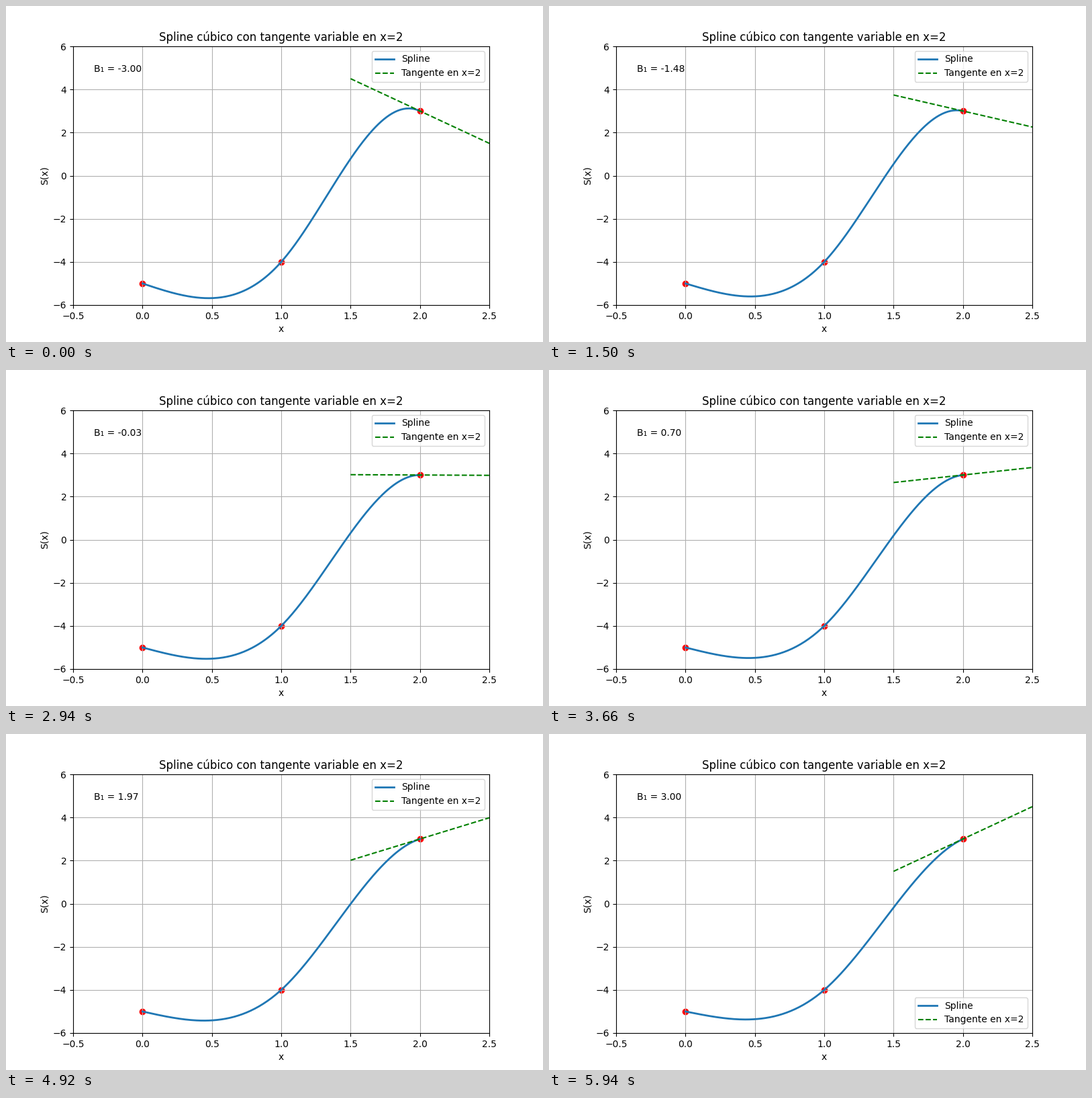
A matplotlib script for the animation above (6 s loop, 800x500 px).

```python
import numpy as np
import matplotlib.pyplot as plt
from matplotlib.animation import FuncAnimation

FRAMES = 100
INTERVAL = 60
KNOTS_X = np.array([0, 1, 2])
KNOTS_Y = np.array([-5, -4, 3])
SLOPES = np.linspace(-3, 3, FRAMES)


def hermite(t, y0, y1, m0, m1):
    """Cubic on [0, 1] with given end values and end slopes."""
    d = y1 - y0
    return y0 + m0 * t + (3 * d - 2 * m0 - m1) * t**2 + (m0 + m1 - 2 * d) * t**3


def spline(x, end_slope):
    """Cubic spline, natural at the left end and clamped at the right end."""
    y0, y1, y2 = KNOTS_Y
    system = [[2, 1, 0], [1, 4, 1], [0, 0, 1]]
    m0, m1, m2 = np.linalg.solve(system, [3 * (y1 - y0), 3 * (y2 - y0), end_slope])
    return np.where(x <= 1,
                    hermite(x, y0, y1, m0, m1),
                    hermite(x - 1, y1, y2, m1, m2))


x = np.linspace(0, 2, 201)
tangent_x = np.linspace(1.5, 2.5, 50)

fig, ax = plt.subplots(figsize=(8, 5), dpi=100)
ax.set(xlim=(-0.5, 2.5), ylim=(-6, 6), xlabel="x", ylabel="S(x)",
       title="Spline cúbico con tangente variable en x=2")
ax.grid(True)
ax.scatter(KNOTS_X, KNOTS_Y, color="red")
curve, = ax.plot([], [], lw=2, label="Spline")
tangent, = ax.plot([], [], "g--", label="Tangente en x=2")
label = ax.text(0.05, 0.9, "", transform=ax.transAxes)
# The legend moves away once the tangent reaches it.
ax.legend(loc="best")


def update(i):
    slope = SLOPES[i]
    curve.set_data(x, spline(x, slope))
    tangent.set_data(tangent_x, KNOTS_Y[-1] + slope * (tangent_x - 2))
    label.set_text(f"B₁ = {slope:.2f}")
    return curve, tangent, label


anim = FuncAnimation(fig, update, frames=FRAMES, interval=INTERVAL,
                     repeat=True, repeat_delay=0, blit=False)
plt.show()
```
